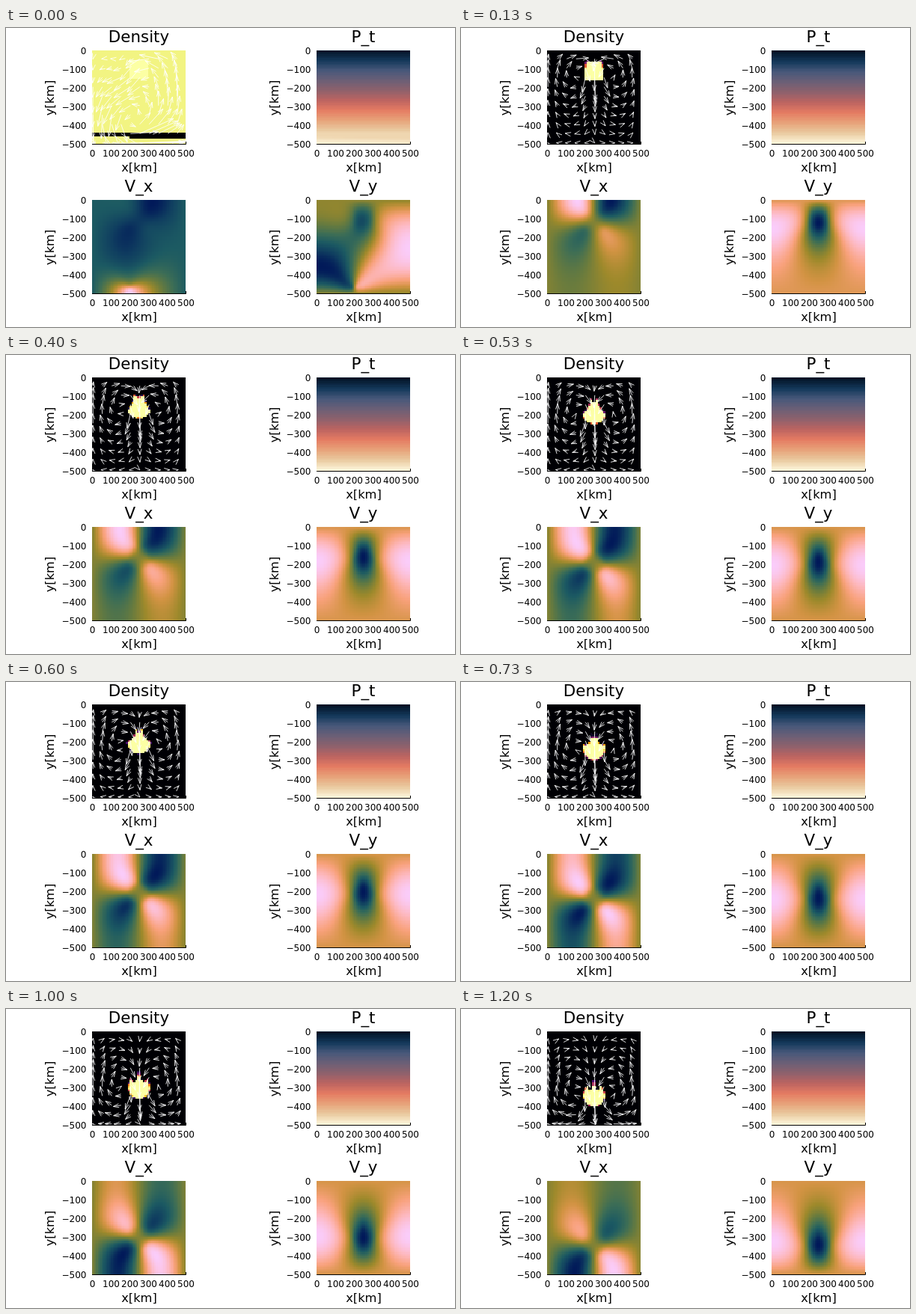
An HTML page with a canvas that plays this animation: 600x400 px, repeating every 1.27 s.

```html
<!DOCTYPE html>
<html lang="en">
<head>
<meta charset="utf-8">
<title>Sinking block</title>
<style>
  html, body { margin: 0; width: 100%; height: 100%; overflow: hidden; background: #fff; }
  canvas { display: block; }
</style>
</head>
<body>
<canvas id="stage" width="600" height="400"></canvas>
<script>
const ctx = document.getElementById('stage').getContext('2d');
const N = 50, MODES = 30, KM = 500, CELL = KM / N, SIZE = 125, PX = SIZE / KM;
const FRAMES = 19, LOOP = 1270, SUBSTEPS = 3, PER_SIDE = 5;

const ramp = hexes => {
  const stops = hexes.split(' ').map(h => [0, 2, 4].map(i => parseInt(h.slice(i, i + 2), 16)));
  return t => {
    const s = Math.min(Math.max(t, 0), 1) * (stops.length - 1);
    const i = Math.min(Math.floor(s), stops.length - 2);
    return stops[i].map((c, n) => c + (stops[i + 1][n] - c) * (s - i));
  };
};
const fire = ramp('000004 1b0c41 4a0c6b 781c6d a52c60 cf4446 ed6925 fb9b06 f7d13d fcffa4');
const pale = ramp('000004 f2f482 fcffa4');
const dusk = ramp('031326 13385a 47587a 6b5f76 8e616c bc6461 e57b62 e7a279 e9c99f fdf5da');
const earth = ramp('011959 103f60 1c5a62 3c6d56 687b3e 9d892b d29343 f8a17b fdb7bc faccfa');

const grid = f => Float64Array.from({ length: N * N }, (_, c) => f(c % N, Math.floor(c / N)));
const table = f => Array.from({ length: MODES + 1 }, (_, m) =>
  Float64Array.from({ length: N }, (_, i) => f(m * Math.PI * (i + 0.5) / N)));
const SIN = table(Math.sin), COS = table(Math.cos);

// Stokes flow in a free-slip box, solved with a double sine series (y points down).
function solve(rho) {
  const u = new Float64Array(N * N), v = new Float64Array(N * N);
  for (let m = 1; m <= MODES; m++) {
    const column = new Float64Array(N), us = new Float64Array(N), vs = new Float64Array(N);
    for (let c = 0; c < N * N; c++) column[Math.floor(c / N)] += rho[c] * COS[m][c % N];
    for (let n = 1; n <= MODES; n++) {
      let r = 0;
      for (let j = 0; j < N; j++) r += column[j] * SIN[n][j];
      r *= m / (m * m + n * n) ** 2;
      for (let j = 0; j < N; j++) {
        us[j] -= n * r * COS[n][j];
        vs[j] += m * r * SIN[n][j];
      }
    }
    for (let j = 0, c = 0; j < N; j++) {
      for (let i = 0; i < N; i++, c++) {
        u[c] += us[j] * SIN[m][i];
        v[c] += vs[j] * COS[m][i];
      }
    }
  }
  return { u, v };
}

function sample(field, x, y) {
  const gx = Math.min(Math.max(x / CELL - 0.5, 0), N - 1.001);
  const gy = Math.min(Math.max(y / CELL - 0.5, 0), N - 1.001);
  const i = Math.floor(gx), j = Math.floor(gy), a = gx - i, b = gy - j, c = j * N + i;
  return (field[c] * (1 - a) + field[c + 1] * a) * (1 - b) +
         (field[c + N] * (1 - a) + field[c + N + 1] * a) * b;
}

// Markers carry the dense block, at first 200..300 km by 50..150 km.
const markers = [], side = 10 * PER_SIDE, gap = 100 / side;
for (let j = 0; j < side; j++) {
  for (let i = 0; i < side; i++) markers.push({ x: 200 + (i + 0.5) * gap, y: 50 + (j + 0.5) * gap });
}
const mean = f => markers.reduce((sum, p) => sum + f(p), 0) / markers.length;

function blockDensity() {
  const rho = new Float64Array(N * N);
  for (const p of markers) rho[Math.floor(p.y / CELL) * N + Math.floor(p.x / CELL)] += 1 / PER_SIDE ** 2;
  return rho;
}

// Scale that turns flow into km per frame; the block is slower near top and bottom.
function pace({ v }) {
  const speed = 16 * Math.sin(Math.PI * (mean(p => p.y) + 15) / KM);
  return speed / mean(p => sample(v, p.x, p.y));
}

function advance() {
  for (let s = 0; s < SUBSTEPS; s++) {
    const flow = solve(blockDensity()), k = pace(flow) / SUBSTEPS;
    for (const p of markers) {
      const dx = sample(flow.u, p.x, p.y) * k, dy = sample(flow.v, p.x, p.y) * k;
      p.x += dx;
      p.y += dy;
    }
  }
}

function firstState() {
  const block = blockDensity();
  const empty = grid((i, j) => j === 44 || j === 45 || (j === 46 && i >= 20) ? 1 : 0);
  return {
    ...solve(block.map((b, c) => b - 32 * empty[c])),
    colors: pale,
    density: block.map((b, c) => empty[c] ? 0 : 0.5 + b / 2),
    pressure: grid((i, j) => {
      const d = (j + 0.5) * CELL;
      return (d - Math.min(Math.max(d - 440, 0), 20 + 10 * i / N)) / 478;
    })
  };
}

function sinkingState() {
  const density = blockDensity();
  return {
    ...solve(density),
    colors: fire,
    density: density.map(d => 2 * d - 0.5),
    pressure: grid((i, j) => j / (N - 1))
  };
}

const states = [firstState()];
while (states.length < FRAMES) {
  states.push(sinkingState());
  advance();
}

const tile = document.createElement('canvas');
tile.width = tile.height = N;
const tileCtx = tile.getContext('2d');

function heatmap(x, y, values, colors) {
  const image = tileCtx.createImageData(N, N);
  values.forEach((value, c) => image.data.set([...colors(value), 255], c * 4));
  tileCtx.putImageData(image, 0, 0);
  ctx.imageSmoothingEnabled = false;
  ctx.drawImage(tile, x, y, SIZE, SIZE);
}

function stretch(values) {
  const low = Math.min(...values), high = Math.max(...values);
  return values.map(v => (v - low) / (high - low));
}

function text(str, x, y, size, align = 'center') {
  ctx.font = `${size}px "DejaVu Sans", sans-serif`;
  ctx.textAlign = align;
  ctx.fillText(str, x, y);
}

function panel(x, y, title, values, colors) {
  heatmap(x, y, values, colors);
  ctx.fillStyle = ctx.strokeStyle = '#000';
  ctx.lineWidth = 1;
  ctx.beginPath();
  ctx.moveTo(x, y + SIZE + 0.5);
  ctx.lineTo(x + SIZE + 0.5, y + SIZE + 0.5);
  ctx.lineTo(x + SIZE + 0.5, y + SIZE - 3);
  ctx.stroke();
  text(title, x + 62.5, y - 11.2, 21.4);
  text('x[km]', x + 63, y + 162, 16.3);
  for (let k = 0; k <= 5; k++) {
    text(k * 100, x + 0.5 + k * 25, y + 142, 12);
    text(k ? '−' + k * 100 : '0', x - 7.5, y + 5.3 + k * 25, 12, 'right');
  }
  ctx.save();
  ctx.translate(x - 51, y + 63.5);
  ctx.rotate(-Math.PI / 2);
  text('y[km]', 0, 0, 16.3);
  ctx.restore();
}

function arrows(x, y, { u, v }) {
  const scale = 32 / Math.max(...v.map(Math.abs));
  ctx.save();
  ctx.beginPath();
  ctx.rect(x, y, SIZE, SIZE);
  ctx.clip();
  ctx.strokeStyle = 'rgba(255,255,255,0.85)';
  ctx.beginPath();
  for (let j = 4; j < N; j += 5) {
    for (let i = 0; i < N; i += 5) {
      const c = j * N + i, dx = u[c] * scale, dy = v[c] * scale;
      const px = x + (i + 0.5) * CELL * PX, py = y + (j + 0.5) * CELL * PX;
      const tx = px + dx, ty = py + dy, angle = Math.atan2(dy, dx);
      const barb = turn => [tx - 8 * Math.cos(angle + turn), ty - 8 * Math.sin(angle + turn)];
      ctx.moveTo(px, py);
      ctx.lineTo(tx, ty);
      ctx.moveTo(...barb(0.32));
      ctx.lineTo(tx, ty);
      ctx.lineTo(...barb(-0.32));
    }
  }
  ctx.stroke();
  ctx.restore();
}

function draw(state) {
  ctx.fillStyle = '#fff';
  ctx.fillRect(0, 0, 600, 400);
  panel(115, 30, 'Density', state.density, state.colors);
  arrows(115, 30, state);
  panel(415, 30, 'P_t', state.pressure, dusk);
  panel(115, 230, 'V_x', stretch(state.u), earth);
  panel(415, 230, 'V_y', stretch(state.v.map(v => -v)), earth);
}

// Fifteen pictures a second, on a 10 ms clock.
function indexAt(ms) {
  let k = 0;
  while (k < FRAMES - 1 && Math.round((k + 1) * 20 / 3) * 10 <= ms) k++;
  return k;
}

let shown = -1;
const start = performance.now();
function tick() {
  const k = indexAt((performance.now() - start) % LOOP);
  if (k !== shown) draw(states[shown = k]);
  requestAnimationFrame(tick);
}
tick();
</script>
</body>
</html>
```
